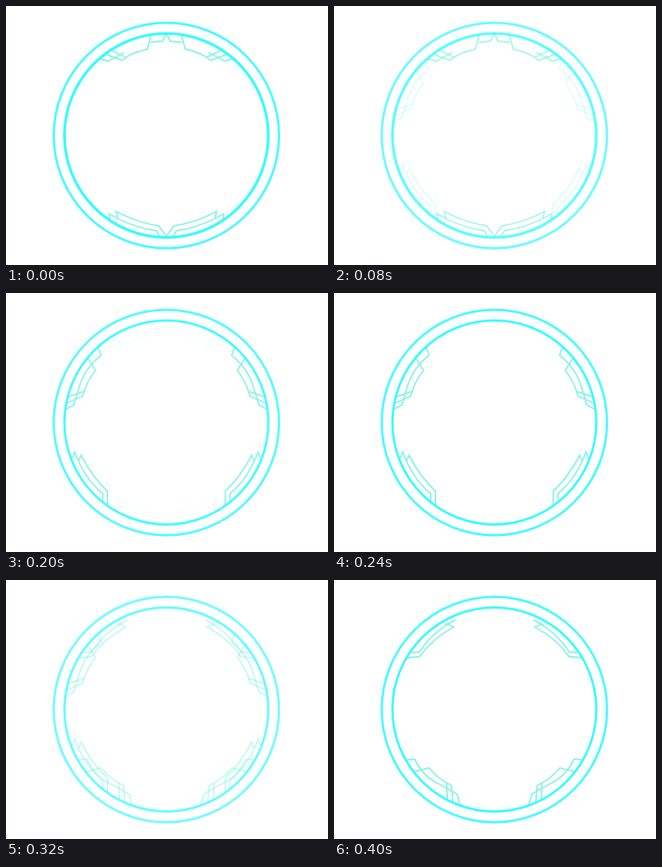
An HTML page with a canvas for the animation above (0.44 s loop, 403 by 324 pixels).

```html
<!DOCTYPE html>
<html lang="en">
<head>
<meta charset="utf-8">
<style>
html, body { margin: 0; width: 100%; height: 100%; overflow: hidden; background: #fff; }
canvas { display: block; }
</style>
</head>
<body>
<canvas id="stage" width="403" height="324"></canvas>
<script>
const ctx = document.getElementById('stage').getContext('2d');
const CX = 200.7, CY = 162;
const STEP = 40, STEPS = 11;

// Left half of each ornament; the right half is its mirror image.
const poses = [
  { innerWidth: 3.4, paths: [
    'M200.7 34 L196 44 L181 45.5',
    'M182 36 L177 54 Q163 57 154 62 L145 68 L124 60',
    'M131 55 L150 64',
    'M117 66 L128 69 L148 58',
    'M130 267 L129 260 L140 266 Q164 278 188 281 L192 288',
    'M140 266 L138 257 Q164 271 191 275 L200.7 288'
  ] },
  { innerWidth: 2.8, paths: [
    'M115 67 L119 78 Q97 95 90 123 L85 140 L74 146',
    'M102 81 L112 97 Q101 110 96 129 L75 138',
    'M98 123 L77 130',
    'M83 207 L86 199 Q98 232 121 251 L121 261',
    'M91 210 L94 203 Q107 229 127 248 L127 265'
  ] },
  { innerWidth: 2.8, paths: [
    'M139 56 L152 50 Q124 64 107 90 L97 91',
    'M142 55 L150 59 Q124 72 107 96 L92 97',
    'M90 225 L101 224 Q111 246 133 256 L154 268 L158 282',
    'M99 240 L119 235 Q130 249 147 257 L149 279',
    'M141 254 L142 275'
  ] }
].map(pose => ({ ...pose, paths: pose.paths.map(d => new Path2D(d)) }));

function ring(radius, width) {
  ctx.lineWidth = width;
  ctx.beginPath();
  ctx.arc(CX, CY, radius, 0, Math.PI * 2);
  ctx.stroke();
}

function drawPose(pose, alpha) {
  if (alpha <= 0) return;
  ctx.globalAlpha = alpha;
  ctx.strokeStyle = '#8cf3e4';
  ctx.lineWidth = 1.9;
  for (const side of [1, -1]) {
    ctx.save();
    if (side < 0) {
      ctx.translate(2 * CX, 0);
      ctx.scale(-1, 1);
    }
    pose.paths.forEach(path => ctx.stroke(path));
    ctx.restore();
  }
  ctx.strokeStyle = '#4cfaff';
  ring(141, 2.9);
  ctx.strokeStyle = '#36fcff';
  ring(127.6, pose.innerWidth);
}

const smooth = u => u * u * (3 - 2 * u);

function draw(now) {
  const time = Math.floor(now / STEP) % STEPS * STEP;
  const first = time < 240;
  const mix = smooth(first ? time / 240 : (time - 240) / 160);
  ctx.globalAlpha = 1;
  ctx.fillStyle = '#fff';
  ctx.fillRect(0, 0, 403, 324);
  drawPose(poses[first ? 0 : 1], 1 - mix);
  drawPose(poses[first ? 1 : 2], mix);
}

let start;
function tick(now) {
  start ??= now;
  draw(now - start);
  requestAnimationFrame(tick);
}
draw(0);
requestAnimationFrame(tick);
</script>
</body>
</html>
```
